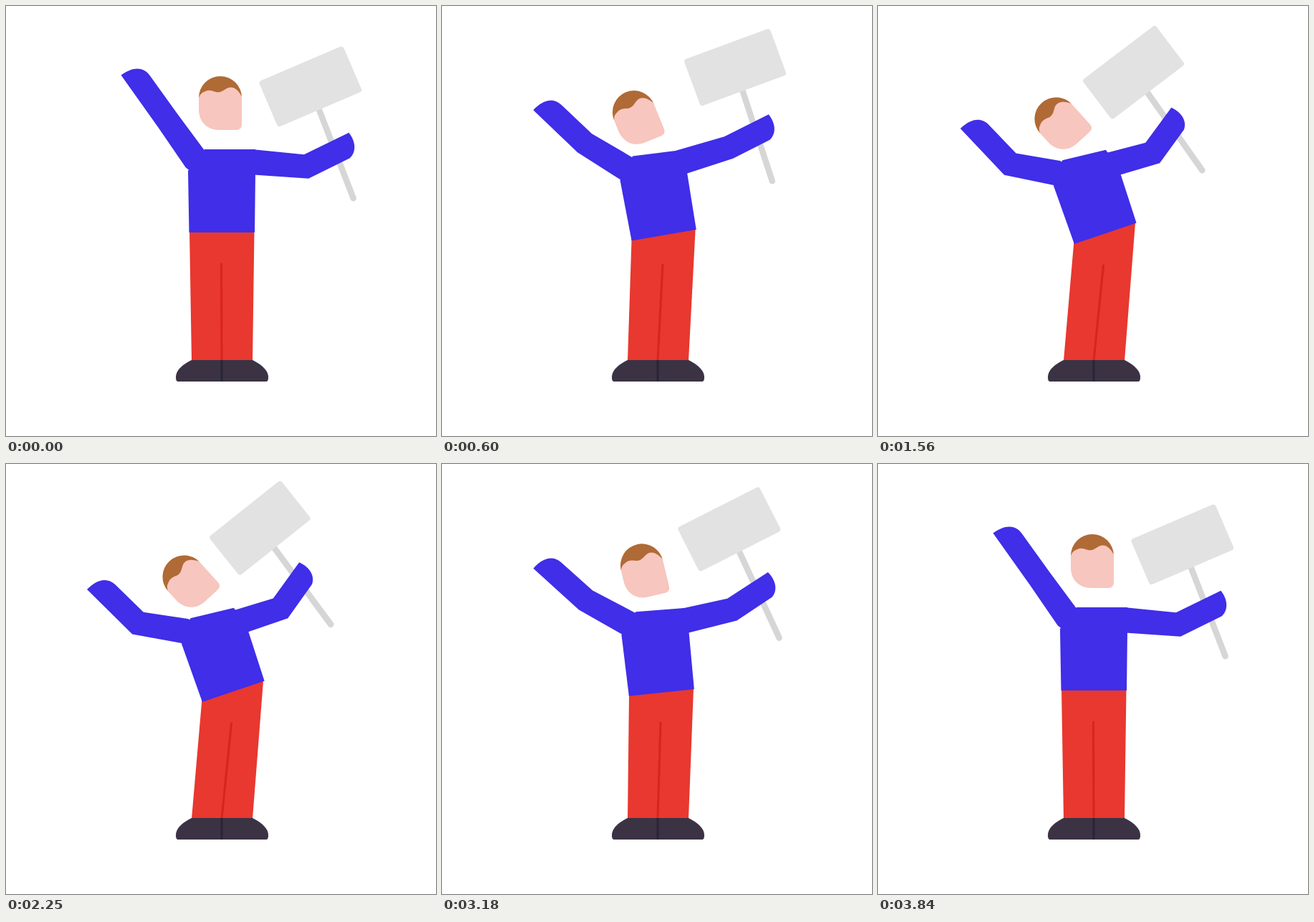
An HTML page that plays this animation: 600x600 px, repeating every 3870 ms.

```html
<!DOCTYPE html>
<html lang="en">
<head>
<meta charset="utf-8">
<title>Protester</title>
<style>
  html, body { margin: 0; width: 100%; height: 100%; overflow: hidden; background: #fff; }
  svg { display: block; width: 100vw; height: 100vh; }
</style>
</head>
<body>
<svg viewBox="0 0 600 600">
  <g id="sign">
    <path d="M-19-70L-24 70" stroke="#d6d6d6" stroke-width="8.5" stroke-linecap="round"/>
    <rect x="-81.6" y="-131.5" width="128" height="69.3" rx="4" fill="#e2e2e2"/>
  </g>
  <path id="trousers" fill="#e8382f"/>
  <path id="seam" stroke="#d9241d" stroke-width="3" stroke-linecap="round"/>
  <path d="M259 494H344C356 500 366 508 366 518Q366 524 363 524H240Q237 524 237 518C237 508 247 500 259 494Z" fill="#3b3344"/>
  <path d="M301 494V524" stroke="#2a2438" stroke-width="3"/>
  <g fill="#402ee8">
    <path id="torso"/>
    <path id="leftArm"/>
    <path id="rightArm"/>
  </g>
  <g id="head">
    <path d="M-30-9C-20-38 20-38 30-9V29.5Q30 37.5 22 37.5H-2C-18 37.5-30 26-30 9Z" fill="#f7c6be"/>
    <path d="M-30-7.5A30 30 0 0 1 30-7.5V-9C26-17 19-25 10-21C4-18 1-14-6-15.5C-12-18-17-19-22-16Q-28-14-30-7.5Z" fill="#b06a35"/>
  </g>
</svg>
<script>
const STEP = 30, STEPS = 129, RAD = Math.PI / 180;
const el = id => document.getElementById(id);

// right: target x, y | shoulder x, y | elbow x, y | forearm | sign tilt || left: target x, y
// (shoulder and elbow are relative to the body, targets to the stage)
const REST = [479, 194.5, 46, -98, 118, -92, 67, 3, 180.5, 96.5];
const WIDE = [505, 231, 42, -100, 114, -94, 60, 2, 183, 74];
const HIGH = [418, 119, 38.5, -93, 107, -114, 66, 10, 118, 196];
const LOW = [418.5, 164, 25.5, -88.5, 97, -80, 58, 18, 138, 163];
const POSES = [
  [0, REST], [10.5, WIDE], [28.5, HIGH], [47, LOW], [64.5, HIGH],
  [81, LOW], [97.5, HIGH], [115.5, WIDE], [128, REST]
];

function ease(p) {
  p = Math.min(1, Math.max(0, p));
  return p < 0.5 ? 2 * p * p : 1 - 2 * (1 - p) ** 2;
}

function poseAt(f) {
  let i = 0;
  while (i < POSES.length - 2 && f >= POSES[i + 1][0]) i++;
  const [t0, a] = POSES[i], [t1, b] = POSES[i + 1];
  const p = ease((f - t0) / (t1 - t0));
  return a.map((v, n) => v + (b[n] - v) * p);
}

const fmt = p => p[0].toFixed(2) + ' ' + p[1].toFixed(2);
const poly = pts => 'M' + pts.map(fmt).join('L') + 'Z';
const angle = (p, q) => Math.atan2(q[1] - p[1], q[0] - p[0]);

// Point at (along, across) in a frame at o turned by angle a
function place(o, a, along, across) {
  const c = Math.cos(a), s = Math.sin(a);
  return [o[0] + along * c - across * s, o[1] + along * s + across * c];
}

// Elbow of a two-bone arm that bends downwards on the left side
function bendElbow(shoulder, target, upper, lower) {
  const gap = Math.hypot(target[0] - shoulder[0], target[1] - shoulder[1]);
  const d = Math.min(gap, upper + lower);
  const cos = (upper * upper + d * d - lower * lower) / (2 * upper * d);
  return place(shoulder, angle(shoulder, target) - Math.acos(Math.min(1, cos)), upper, 0);
}

// cap: slant of the hand end, then its two curve handles
function armPath(shoulder, elbow, b, lower, cap) {
  const a = angle(shoulder, elbow);
  const mid = elbow[0] < shoulder[0] ? (a + b + (a < 0 ? 2 : 0) * Math.PI + (b < 0 ? 2 : 0) * Math.PI) / 2 : (a + b) / 2;
  const miter = 16.4 / Math.cos(a - mid);
  const [slant, x1, y1, x2, y2] = cap;
  const at = (x, y) => fmt(place(elbow, b, lower + x, y));
  const root = y => [fmt(place(shoulder, a, 0, y)), fmt(place(shoulder, a, -12, y * 0.8))];
  const [top, topIn] = root(-17.6), [low, lowIn] = root(17.6);
  return 'M' + topIn + 'L' + top +
    'L' + fmt(place(elbow, mid, 0, -miter)) +
    'L' + at(slant, -16.2) +
    'C' + at(x1, y1) + ' ' + at(x2, y2) + ' ' + at(-slant, 16.2) +
    'L' + fmt(place(elbow, mid, 0, miter)) +
    'L' + low + 'L' + lowIn + 'Z';
}

function draw(f) {
  const [rx, ry, sx, sy, ex, ey, forearm, tilt, lx, ly] = poseAt(f);
  const k = ease((f - 2) / 35) * (1 - ease((f - 82) / 40));
  const swing = k * (1 - k);
  const lean = -18.6 * k;
  const hip = [301 + 16 * k, 316 + 1.5 * k + 12 * swing];
  const body = (x, y) => place(hip, lean * RAD, x, y);

  el('trousers').setAttribute('d', poly([body(-45, -3), body(45.5, -3), [344, 495], [259, 495]]));
  el('seam').setAttribute('d', 'M' + fmt([300.5 + 14 * k, 360 + 2 * k]) + 'L301 495');
  el('torso').setAttribute('d', poly([
    body(-45.5, 0), body(-47, -86), body(-24, -116),
    body(47 - 9 * k, -116 + 5.5 * k), body(47, -84), body(46, 0)
  ]));

  const leftShoulder = body(-36, -101), leftTarget = [lx, ly];
  const leftForearm = Math.max(72, 78 - 18 * k);
  const leftElbow = bendElbow(leftShoulder, leftTarget, 67.5, leftForearm);
  el('leftArm').setAttribute('d', armPath(
    leftShoulder, leftElbow, angle(leftElbow, leftTarget), leftForearm, [11.7, 12, 2, 5, 16]));

  const elbow = body(ex, ey);
  const aim = angle(elbow, [rx, ry]);
  el('rightArm').setAttribute('d', armPath(body(sx, sy), elbow, aim, forearm, [7.2, 10, -4, 7, 12]));

  const slide = tilt - 3;
  el('sign').setAttribute('transform',
    `translate(${fmt(place(elbow, aim, forearm, 0))}) rotate(${aim / RAD + tilt}) translate(${0.55 * slide} ${0.6 * slide})`);
  el('head').setAttribute('transform',
    `translate(${299 - 45.5 * k - 17 * swing} ${135.5 + 27.5 * k + 20 * swing}) rotate(${2.26 * lean})`);
}

const start = performance.now();
function tick() {
  draw(Math.floor((performance.now() - start) / STEP) % STEPS);
  requestAnimationFrame(tick);
}
tick();
</script>
</body>
</html>
```
